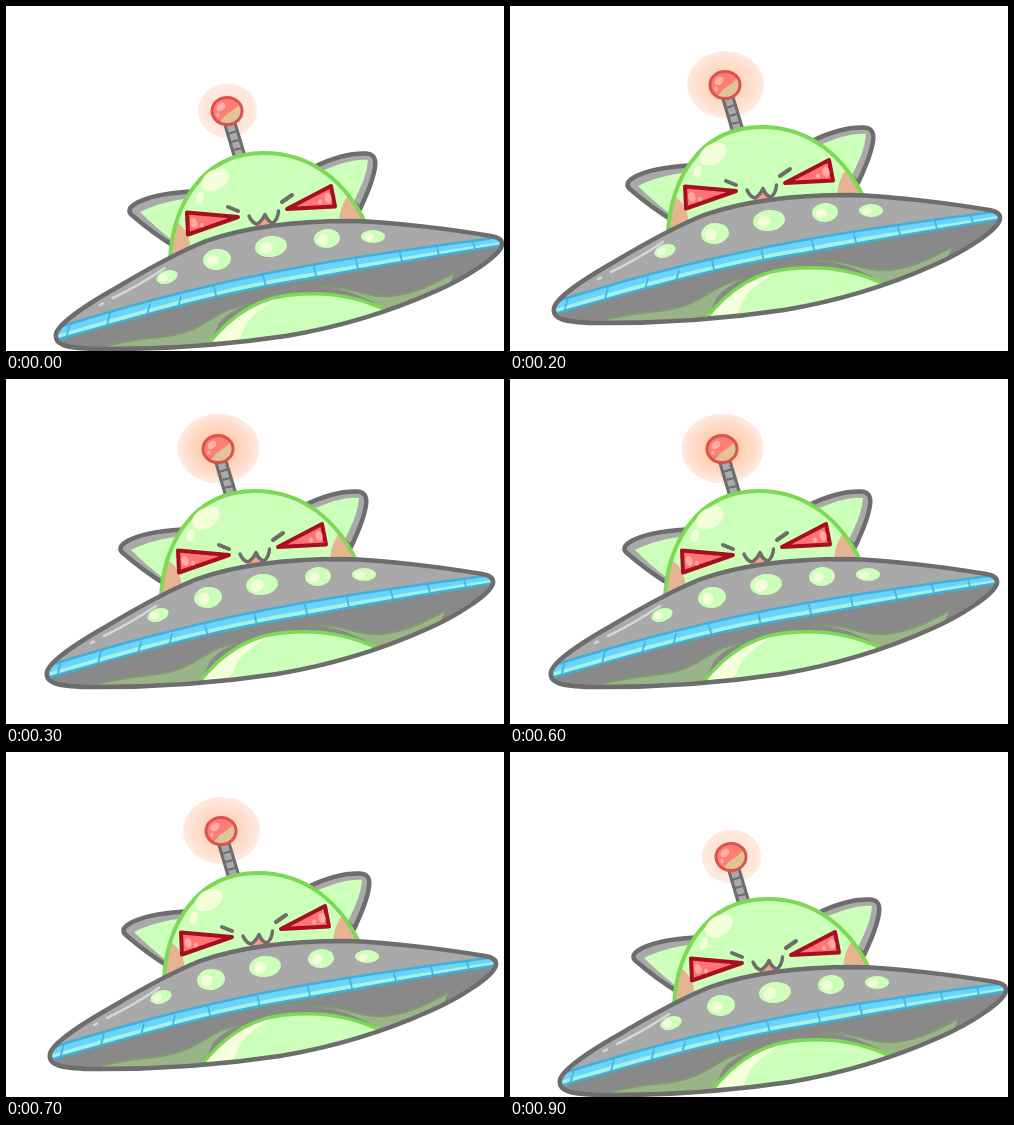
Write an HTML page with a canvas that moves like this. It is 498 px wide and 345 px high and loops after 1000 ms.

```html
<!DOCTYPE html>
<html lang="en">
<head>
<meta charset="utf-8">
<title>Hovering saucer</title>
<style>
html, body { margin: 0; width: 100%; height: 100%; overflow: hidden; background: #fff; }
canvas { display: block; }
</style>
</head>
<body>
<canvas id="stage" width="498" height="345"></canvas>
<script>
const ctx = document.getElementById('stage').getContext('2d');
const GREY = '#a9a9a9', DARK = '#6d6d6d', MINT = '#ccffb9', LEAF = '#7bd953', PALE = '#f2ffd8';
const BLUSH = '#e6b491', CORAL = '#ff7477', CRIMSON = '#a70f20';

// Poses from lowest to highest: shift of the craft and radii of the antenna glow.
const poses = [
  { dx: 0, dy: 0, rx: 29.5, ry: 27, heat: 0 },
  { dx: -3, dy: -12, rx: 33, ry: 30, heat: 0.25 },
  { dx: -6, dy: -26, rx: 38.5, ry: 33.5, heat: 0.65 },
  { dx: -9, dy: -35, rx: 41, ry: 35, heat: 1 },
  { dx: -12, dy: -43.5, rx: 0, ry: 0, heat: 0 }
];

function shape(d, fill, stroke, width = 3) {
  const path = new Path2D(d);
  if (fill) { ctx.fillStyle = fill; ctx.fill(path); }
  if (stroke) { ctx.strokeStyle = stroke; ctx.lineWidth = width; ctx.stroke(path); }
}

function oval(x, y, rx, ry, fill, turn = 0, stroke, width) {
  ctx.beginPath();
  ctx.ellipse(x, y, rx, ry, turn, 0, Math.PI * 2);
  if (fill) { ctx.fillStyle = fill; ctx.fill(); }
  if (stroke) { ctx.strokeStyle = stroke; ctx.lineWidth = width; ctx.stroke(); }
}

function clipped(d, draw) {
  ctx.save();
  ctx.clip(new Path2D(d));
  draw();
  ctx.restore();
}

function drawGlow({ rx, ry, heat }) {
  if (!rx) return;
  ctx.save();
  ctx.translate(221.5, 104.5);
  ctx.scale(rx, ry);
  const glow = ctx.createRadialGradient(0, 0, 0.3, 0, 0, 1);
  glow.addColorStop(0, `rgb(255,${229 - 27 * heat},${217 - 50 * heat})`);
  glow.addColorStop(0.65, `rgb(255,${230 - 9 * heat},${219 - 16 * heat})`);
  glow.addColorStop(1, '#ffebe2');
  oval(0, 0, 1, 1, glow);
  ctx.restore();
}

function drawAntenna() {
  shape('M219 119L229 117L239 150L229 153Z', GREY, DARK, 3);
  shape('M222 128L231 125M225 136L233 134M227 144L236 142', null, DARK, 2);
  oval(221, 105, 15, 13.5, '#ff7d75');
  clipped('M206 105a15 13.5 0 1 0 30 0a15 13.5 0 1 0 -30 0', () =>
    shape('M211 121Q217 110 224 106Q231 102 236 95V121Z', '#e2c494'));
  oval(215, 101, 5, 3.5, '#ffb0a4', -0.7);
  oval(212, 109, 1.8, 2.2, '#ffb0a4');
  oval(221, 105, 15, 13.5, null, 0, '#d9534f', 3);
}

function drawEars() {
  shape('M185 185.5C160 187 140 191 129 198Q119 204 127 210Q148 228 168 240Z', GREY, DARK, 4.5);
  shape('M186 192C166 194 147 199 134 206Q148 220 167 235Z', MINT);
  shape('M308 161C326 152 345 147 360 147.5Q371 148 369 161C367 176 360 190 354 203Z', GREY, DARK, 4.5);
  shape('M314 166C332 158 348 153 362 154C361 169 354 183 347 197Z', MINT);
}

function drawDome() {
  const dome = 'M164 252C167 203 193 147 258 147C307 147 341 178 360 218';
  shape(dome, MINT);
  clipped(dome, () => {
    shape('M160 212Q182 216 185 243L172 256H160Z', BLUSH);
    shape('M343 188Q333 200 333 219H364V205Z', BLUSH);
  });
  shape(dome, null, LEAF, 4);
  oval(209, 174, 15, 10, PALE, -0.55);
  oval(194, 192, 4, 6.5, PALE, 0.2);
}

function drawFace() {
  shape('M181 206.5L232 211L182 228.5Z', CORAL, CRIMSON, 4);
  shape('M281 203L325 180L329 200.5Z', CORAL, CRIMSON, 4);
  oval(188, 217, 3.5, 5, '#ffaaa2', -0.3);
  oval(196, 219, 2, 2.5, '#ffaaa2');
  oval(322, 192, 3.5, 5, '#ffaaa2', -0.2);
  oval(314, 196, 2, 2.5, '#ffaaa2');
  shape('M222 201L232 205M276 196L286 189', null, DARK, 4);
  shape('M250 219L259 209L267 217V224H252Z', '#ff9a8a');
  shape('M243 210Q246 217 251 218Q256 215 259 208.5Q262 216 267 217Q272 213 272.5 205', null, DARK, 3.5);
}

const rimTop = [50, 322, 130, 297, 215, 275, 300, 260, 365, 248, 430, 240, 497, 230.5];
const rimBottom = [50, 334, 120, 314, 210, 287, 300, 273, 365, 261, 440, 248, 497, 239];

// Curve lying a given share of the way from the rim's upper to its lower edge.
function rimEdge(share) {
  const p = rimTop.map((v, i) => v + (rimBottom[i] - v) * share);
  return `M${p[0]} ${p[1]}C${p.slice(2, 8).join(' ')}C${p.slice(8).join(' ')}`;
}

function drawRim() {
  const belowTop = rimEdge(0) + 'L498 345H40Z';
  const belowBottom = rimEdge(1) + 'L498 345H40Z';
  shape(belowTop, '#68d5ff');
  shape(rimEdge(0.6) + 'L498 345H40Z', '#a5f1e2');
  clipped(belowTop, () => {
    for (const x of [62, 102, 142, 173, 210, 259, 309, 351, 395, 432, 468]) {
      const y = x < 300 ? 328 - (x - 50) * 0.244 : 267 - (x - 300) * 0.165;
      const lean = x < 200 ? -2 : 2;
      shape(`M${x - lean} ${y - 8}L${x + lean} ${y + 8}`, null, '#48b5e2', 1.8);
    }
  });
  shape(belowBottom, '#898989');
  shape(rimEdge(0), null, '#43afd9', 2.5);
  shape(rimEdge(1), null, '#43afd9', 2.5);
}

function drawBelly() {
  const sheen = '#9ab489', edge = '#829a70';
  const leftEdge = 'M104 339Q130 333 155 331C180 328 191 322 207 312Q222 302 240 299';
  const rightEdge = 'M312 281C350 280 357 292 386 290C412 287 428 277 448 267';
  shape(leftEdge + 'Q222 306 213 317L200 345H98Z', sheen);
  shape(leftEdge, null, edge, 2);
  shape(rightEdge + 'L440 287L376 308L368 296C352 290 345 283 312 281Z', sheen);
  shape(rightEdge, null, edge, 2);
  const arc = 'M200 341C225 308 255 289 296 288C330 286 360 294 382 305';
  const light = arc + 'L370 345H200Z';
  shape(light, MINT);
  clipped(light, () => shape('M198 342C222 310 248 293 278 290Q240 308 236 329L226 342Z', '#f5ffdc'));
  shape(arc, null, LEAF, 3.5);
}

function drawLamps() {
  const lamps = [[161, 271, 11, 6.5, -0.3], [211, 253.5, 14, 10.5, -0.15],
    [265, 240.5, 16, 10.5, -0.12], [321, 232.5, 13, 9.5, -0.1], [367, 230.5, 12, 6.5, 0]];
  for (const [x, y, rx, ry, turn] of lamps) {
    oval(x, y, rx, ry, MINT, turn);
    oval(x - rx * 0.3, y + ry * 0.1, rx * 0.42, ry * 0.55, PALE, -0.4);
  }
}

function drawSaucer() {
  const hull = 'M50 328C52 318 80 299 110 282C140 264 168 248 200 235C240 221 290 215 345 215' +
    'C390 216 450 224 485 230Q497 232 496 239C494 250 460 272 430 285' +
    'C390 303 340 320 280 330C220 339 150 343.5 90 343C60 342 48 339 50 328Z';
  shape(hull, GREY);
  clipped(hull, () => {
    drawRim();
    drawBelly();
  });
  shape('M107 292Q132 280 159 262M94 299L97 297.5', null, '#d6d6d6', 2.5);
  drawLamps();
  shape(hull, null, DARK, 4.5);
}

function render(now) {
  const step = Math.floor((now % 1000) / 100);
  const pose = poses[Math.min(step, 9 - step)];
  ctx.fillStyle = '#fff';
  ctx.fillRect(0, 0, 498, 345);
  ctx.save();
  ctx.translate(pose.dx, pose.dy);
  ctx.lineCap = ctx.lineJoin = 'round';
  drawGlow(pose);
  drawAntenna();
  drawEars();
  drawDome();
  drawFace();
  drawSaucer();
  ctx.restore();
}

const start = performance.now();
function tick() {
  render(performance.now() - start);
  requestAnimationFrame(tick);
}
tick();
</script>
</body>
</html>
```
